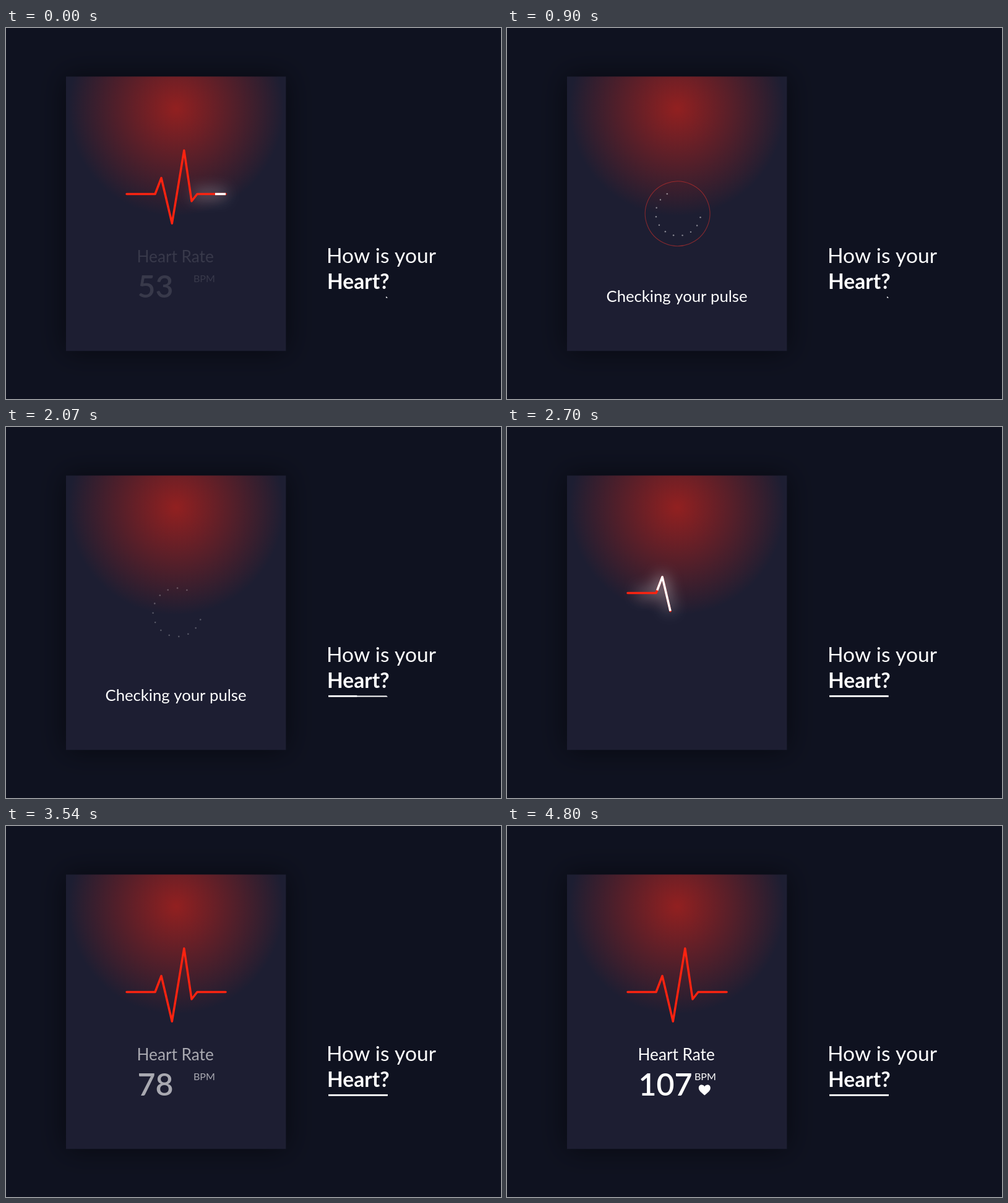
Recreate the animation shown at these times as an HTML page with a canvas. Size 800 by 600 pixels, loop 5280 ms.

```html
<!DOCTYPE html>
<html lang="en">
<head>
<meta charset="utf-8">
<title>How is your Heart?</title>
<style>
  html, body { margin: 0; width: 100%; height: 100%; overflow: hidden; background: #0f1220; }
  canvas { display: block; }
</style>
</head>
<body>
<canvas id="stage" width="800" height="600"></canvas>
<script>
const ctx = document.getElementById('stage').getContext('2d');
const LOOP = 5280, STEP = 30;
const PULSES = [480, 1410];
const OPENING_POSE = 3290;
const FONT = 'Lato, "Open Sans", sans-serif';
const TRACE = [[195, 268.5], [241, 268.5], [251, 242.5], [268.3, 316],
               [287.8, 198], [300, 280], [309, 268.5], [355, 268.5]];

const clamp = x => Math.max(0, Math.min(1, x));
const span = (t, from, to) => clamp((t - from) / (to - from));
const rad = deg => deg * Math.PI / 180;

const lengths = TRACE.slice(1).map((p, i) => Math.hypot(p[0] - TRACE[i][0], p[1] - TRACE[i][1]));
const total = lengths.reduce((a, b) => a + b);

// Text whose ink starts at x
function text(str, x, y, size, weight, alpha = 1) {
  if (alpha <= 0) return;
  ctx.font = `${weight} ${size}px ${FONT}`;
  ctx.fillStyle = `rgba(255,255,255,${alpha})`;
  ctx.fillText(str, x + ctx.measureText(str).actualBoundingBoxLeft, y);
}

function drawCard() {
  const card = [97, 78.5, 355.4, 443.8];
  ctx.fillStyle = '#0f1220';
  ctx.fillRect(0, 0, 800, 600);
  ctx.save();
  ctx.shadowColor = 'rgba(0,0,0,0.55)';
  ctx.shadowBlur = 42;
  ctx.fillStyle = '#1d1e32';
  ctx.fillRect(...card);
  ctx.restore();
  const glow = ctx.createRadialGradient(275, 130, 0, 275, 130, 174);
  glow.addColorStop(0, 'rgba(146,32,32,1)');
  glow.addColorStop(1, 'rgba(146,32,32,0)');
  ctx.fillStyle = glow;
  ctx.fillRect(...card);
}

function drawHeading(t) {
  text('How is your', 521, 380, 33.6, 400);
  text('Heart?', 521, 422, 33.5, 700);
  const left = 614 - 93 * span(t, 1590, 1860);
  const back = 521 + 96 * (1 - Math.pow(1 - span(t, 1850, 2800), 2.5));
  ctx.fillStyle = '#fff';
  ctx.beginPath();
  ctx.moveTo(left, 434.4);
  ctx.lineTo(615, 434.4);
  ctx.lineTo(617, 436.4);
  ctx.lineTo(left, 436.4);
  ctx.fill();
  if (t > 1850) ctx.fillRect(521, 433.9, back - 521, 2.5);
}

function drawPulse(u) {
  if (u <= 0 || u >= 870) return;
  const cx = 276, cy = 300, decay = Math.exp(-u / 182);

  const ringAlpha = 0.72 * (1 - Math.pow(u / 650, 2.8));
  if (ringAlpha > 0) {
    const sweep = Math.min(360, 330 * (1 - Math.exp(-u / 57)) + 0.08 * u);
    ctx.strokeStyle = `rgba(236,${42 + 90 * decay},${34 + 90 * decay},${ringAlpha})`;
    ctx.lineWidth = 5.6 * decay + 0.5;
    ctx.lineCap = 'round';
    ctx.beginPath();
    ctx.arc(cx - 0.4, cy + 0.3, 53.6 - 13 * decay, rad(-66), rad(-66 + sweep));
    ctx.stroke();
  }

  const radius = 40.3 * (1 - decay), first = 20 - 98 * decay;
  const count = 1 + Math.floor(Math.max(0, 293 - 560 * decay) / 23);
  ctx.fillStyle = `rgba(255,255,255,${0.62 * (1 - Math.pow(u / 870, 2))})`;
  for (let i = 0; i < count; i++) {
    const a = rad(first + 23 * i);
    ctx.beginPath();
    ctx.arc(cx + 0.8 + radius * Math.cos(a), cy - 0.3 + radius * Math.sin(a), 0.5 + radius / 50, 0, 7);
    ctx.fill();
  }
}

// Path along the trace between two distances
function tracePath(from, to) {
  let done = 0, started = false;
  ctx.beginPath();
  lengths.forEach((len, i) => {
    const a = Math.max(from, done), b = Math.min(to, done + len);
    if (b > a) {
      const at = d => TRACE[i].map((v, k) => v + (TRACE[i + 1][k] - v) * (d - done) / len);
      if (!started) ctx.moveTo(...at(a));
      ctx.lineTo(...at(b));
      started = true;
    }
    done += len;
  });
}

function drawTrace(t) {
  const along = time => total * (1 - Math.cos(Math.PI * span(time, 2350, 3270))) / 2;
  const head = along(t), tail = along(t - 140), glowTail = along(t - 235);
  if (head <= 0) return;
  ctx.lineWidth = 3.5;
  ctx.lineJoin = 'round';

  if (head - glowTail > 0.5) {
    ctx.save();
    ctx.lineCap = 'butt';
    ctx.strokeStyle = '#fff';
    ctx.shadowColor = 'rgba(255,255,255,0.7)';
    ctx.shadowBlur = 24;
    // Only the shadow falls on the stage
    ctx.shadowOffsetX = 1000;
    ctx.translate(-1000, 0);
    ctx.lineWidth = 6.5;
    tracePath(glowTail, head);
    ctx.stroke();
    ctx.restore();
  }

  ctx.lineCap = 'round';
  ctx.strokeStyle = '#fb2310';
  tracePath(0, head);
  ctx.stroke();

  if (head - tail > 0.5) {
    ctx.lineCap = 'butt';
    ctx.strokeStyle = '#fff';
    tracePath(tail, head);
    ctx.stroke();
  }
}

function drawHeart(t) {
  if (t < 4470) return;
  const scale = t < 4620
    ? 1.32 * Math.sin(span(t, 4440, 4620) * Math.PI / 2)
    : 1 + 0.16 * (1 + Math.cos(Math.PI * span(t, 4620, 4800)));
  ctx.save();
  ctx.translate(319.3, 427);
  ctx.scale(scale, scale);
  ctx.fillStyle = '#fff';
  ctx.beginPath();
  for (const s of [-1, 1]) {
    ctx.moveTo(0, 8.5);
    ctx.bezierCurveTo(s * 5, 4.2, s * 9.5, 1, s * 9.5, -3.3);
    ctx.bezierCurveTo(s * 9.5, -9.4, s * 2.4, -10, 0, -5.6);
    ctx.lineTo(0, 8.5);
  }
  ctx.fill();
  ctx.restore();
}

function drawReading(t) {
  const alpha = span(t, 3230, 3730);
  if (alpha <= 0) return;
  text('Heart Rate', 213.5, 379, 26.2, 400, alpha);
  text('BPM', 304, 411, 16, 400, alpha);
  const left = 0.5 * Math.pow(Math.max(0, 4560 - t) / 240, 2.81);
  const bpm = t >= 4320 ? 107 : Math.round(107 - left);
  ctx.font = `600 50px ${FONT}`;
  ctx.fillText(bpm, 212.5, 436);
}

function draw(t) {
  const opening = t < 30;
  const pose = opening ? OPENING_POSE : t;
  drawCard();
  drawHeading(t);
  if (!opening) {
    text('Checking your pulse', 161.5, 442.5, 25.7, 400, span(t, 0, 90) * (1 - span(t, 2110, 2340)));
    PULSES.forEach(start => drawPulse(t - start));
  }
  drawTrace(pose);
  drawReading(pose);
  drawHeart(pose);
}

const begin = performance.now();
function tick() {
  const t = (performance.now() - begin) % LOOP;
  draw(Math.floor(t / STEP) * STEP);
  requestAnimationFrame(tick);
}
tick();
</script>
</body>
</html>
```
